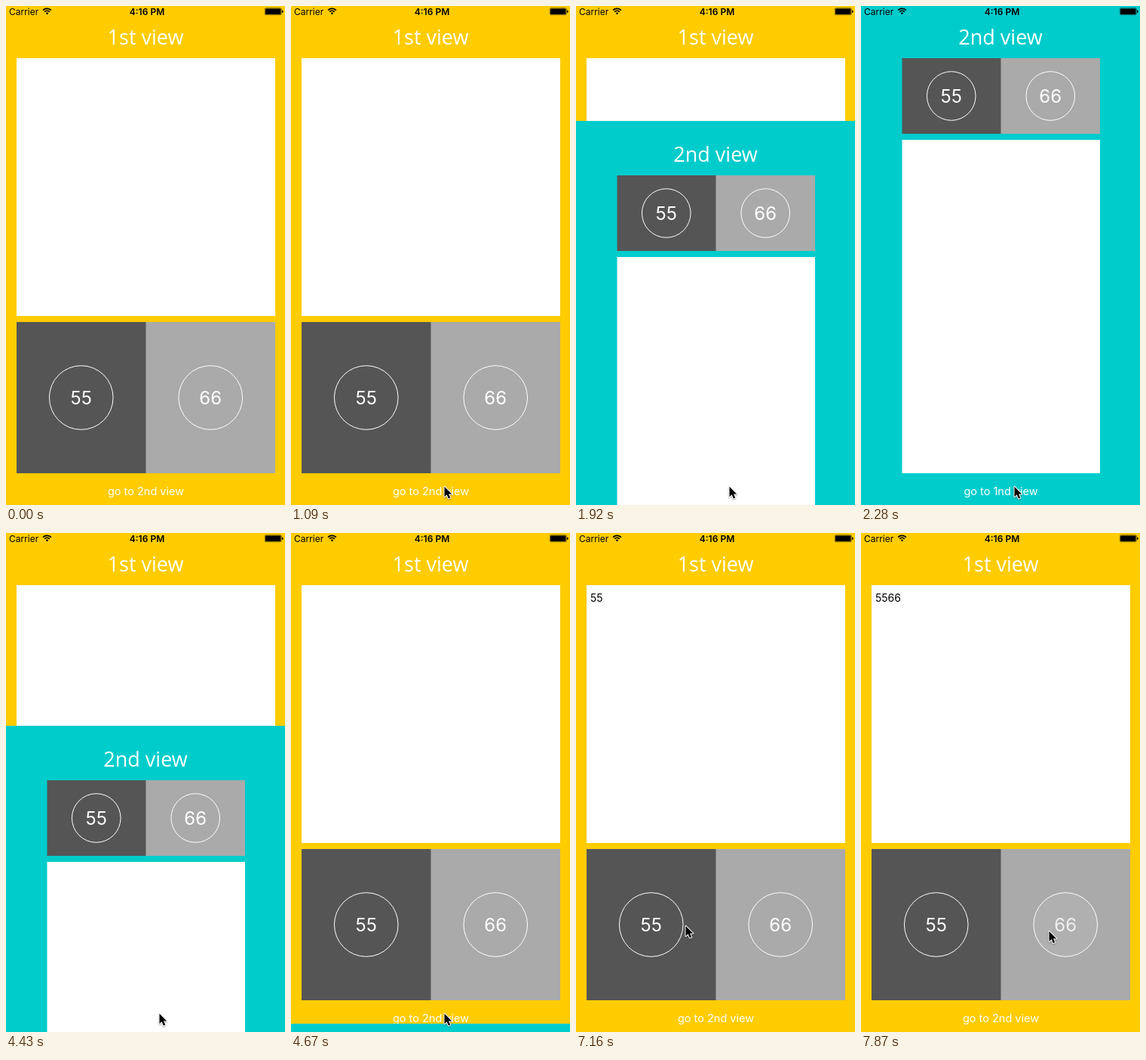
Write an HTML page with a canvas that moves like this. It is 370 by 660 pixels and loops after 7.99 s.

```html
<!DOCTYPE html>
<html lang="en">
<head>
<meta charset="utf-8">
<title>Two views</title>
<style>
  html, body { margin: 0; width: 100%; height: 100%; overflow: hidden; background: #fc0; }
  canvas { display: block; width: 370px; height: 660px; }
</style>
</head>
<body>
<canvas></canvas>
<script>
const W = 370, H = 660, LOOP = 7990;
const VIEW_TOP = -3, TRAVEL = 667;
const YELLOW = '#fc0', CYAN = '#0cc', DARK = '#555', LIGHT = '#aaa';
const UI = 'Inter, "Liberation Sans", sans-serif';
const TITLE = '400 27px "Open Sans", "Noto Sans", sans-serif';
const LINK = `400 14.5px ${UI}`;

const canvas = document.querySelector('canvas');
const dpr = window.devicePixelRatio || 1;
canvas.width = W * dpr;
canvas.height = H * dpr;
const ctx = canvas.getContext('2d');

// The screen refreshes only at these moments and holds in between.
const ticks = [
  0, 500, 620, 740, 860, 980, 1090, 1810, 1920, 2040, 2160, 2280,
  4430, 4550, 4670, 4790, 5390, 5510, 5620, 5740, 6090, 6210, 6320, 6440,
  7160, 7280, 7390, 7630, 7750, 7870
];

const moves = [
  { start: 380, end: 1090, from: [352, 592], to: [203, 635] },
  { start: 5270, end: 5740, from: [203, 635], to: [106, 517] },
  { start: 7040, end: 7390, from: [106, 517], to: [249, 526] }
];

const clamp = x => Math.min(1, Math.max(0, x));
const smooth = x => x * x * (3 - 2 * x);

// Critically damped spring: distance left, from 1 to 0.
function springLeft(ms) {
  if (ms <= 0) return 1;
  const u = Math.sqrt(1000 / 3) * ms / 1000;
  return (1 + u) * Math.exp(-u);
}

function sheetOffset(t) {
  if (t < 1810 || t >= 4790) return TRAVEL;
  if (t >= 2280 && t < 4430) return 0;
  return t < 2280
    ? TRAVEL * springLeft(t - 1767)
    : TRAVEL * (1 - springLeft(t - 4356.7));
}

function cursorAt(t) {
  const move = moves.filter(m => t >= m.start).pop();
  const p = smooth(clamp((t - move.start) / (move.end - move.start)));
  return move.from.map((v, i) => Math.round(v + (move.to[i] - v) * p));
}

const glowAt = (t, press) => t < press ? 0 : Math.pow(clamp(1 - (t - press) / 350), 1.2);

function rect(x, y, w, h, color) {
  ctx.fillStyle = color;
  ctx.fillRect(x, y, w, h);
}

function text(str, x, y, font, color = '#fff', align = 'center') {
  ctx.font = font;
  ctx.fillStyle = color;
  ctx.textAlign = align;
  ctx.fillText(str, x, y);
}

function panels(x, y, w, h) {
  rect(x, y, w, h, DARK);
  rect(185.5, y, x + w - 185.5, h, LIGHT);
}

function roundButton(label, x, y, r, glow = 0) {
  ctx.beginPath();
  ctx.arc(x, y, r, 0, Math.PI * 2);
  if (glow) {
    ctx.fillStyle = `rgba(255,255,255,${0.3 * glow})`;
    ctx.fill();
  }
  ctx.strokeStyle = '#fff';
  ctx.lineWidth = 1;
  ctx.stroke();
  text(label, x, y + 9, `400 24px ${UI}`, `rgba(255,255,255,${1 - 0.8 * glow})`);
}

function firstView(t) {
  rect(0, 0, W, H, YELLOW);
  text('1st view', 185, 51, TITLE);
  rect(14, 69, 343, 341, '#fff');
  const typed = (t >= 6210 ? '55' : '') + (t >= 7750 ? '66' : '');
  text(typed, 19, 91, `400 14px ${UI}`, '#000', 'left');
  panels(14, 418, 343, 200);
  roundButton('55', 99.75, 518, 42.3, glowAt(t, 6090));
  roundButton('66', 271.25, 518, 42.3, glowAt(t, 7630));
  text('go to 2nd view', 185.5, 647, LINK);
}

function secondView(offset) {
  if (offset >= TRAVEL) return;
  ctx.save();
  ctx.translate(0, Math.round(offset));
  rect(0, VIEW_TOP, W, TRAVEL, CYAN);
  text('2nd view', 185, 51, TITLE);
  panels(54.5, 69, 262.5, 100);
  roundButton('55', 119.75, 119, 32.3);
  roundButton('66', 251.25, 119, 32.3);
  rect(54.5, 177, 262.5, 441, '#fff');
  text('go to 1nd view', 185.5, 647, LINK);
  ctx.restore();
}

function statusBar() {
  text('Carrier', 4, 11.5, `400 12px ${UI}`, '#000', 'left');
  text('4:16 PM', 187, 11.5, `600 12px ${UI}`, '#000');

  ctx.strokeStyle = '#000';
  ctx.lineWidth = 1.8;
  for (const r of [4.6, 7.6]) {
    ctx.beginPath();
    ctx.arc(54.5, 11, r, -Math.PI * 0.75, -Math.PI * 0.25);
    ctx.stroke();
  }
  ctx.fillStyle = '#000';
  ctx.beginPath();
  ctx.moveTo(54.5, 11.6);
  ctx.arc(54.5, 11, 2.4, -Math.PI * 0.75, -Math.PI * 0.25);
  ctx.fill();

  ctx.lineWidth = 0.5;
  ctx.beginPath();
  ctx.roundRect(343.25, 2.75, 22, 9, 1.5);
  ctx.stroke();
  ctx.beginPath();
  ctx.roundRect(344, 3.5, 20.5, 7.5, 1);
  ctx.fill();
  ctx.beginPath();
  ctx.arc(366, 7.25, 1.7, -Math.PI / 2, Math.PI / 2);
  ctx.fill();
}

const arrow = new Path2D('M.5 .8V14.2L3.6 11.3L5.9 16.6L8.3 15.6L6 10.4H10.2Z');

function cursor([x, y]) {
  ctx.save();
  ctx.translate(x, y);
  ctx.lineJoin = 'round';
  ctx.strokeStyle = '#fff';
  ctx.lineWidth = 2;
  ctx.shadowColor = 'rgba(0,0,0,.35)';
  ctx.shadowBlur = 2 * dpr;
  ctx.shadowOffsetY = dpr;
  ctx.stroke(arrow);
  ctx.shadowColor = 'transparent';
  ctx.fillStyle = '#000';
  ctx.fill(arrow);
  ctx.restore();
}

function draw(time) {
  const t = ticks.filter(tick => tick <= time).pop();
  ctx.setTransform(dpr, 0, 0, dpr, 0, 0);
  firstView(t);
  secondView(sheetOffset(t));
  statusBar();
  if (t >= 500) cursor(cursorAt(t));
}

const start = performance.now();
function loop() {
  draw((performance.now() - start) % LOOP);
  requestAnimationFrame(loop);
}
loop();
</script>
</body>
</html>
```
